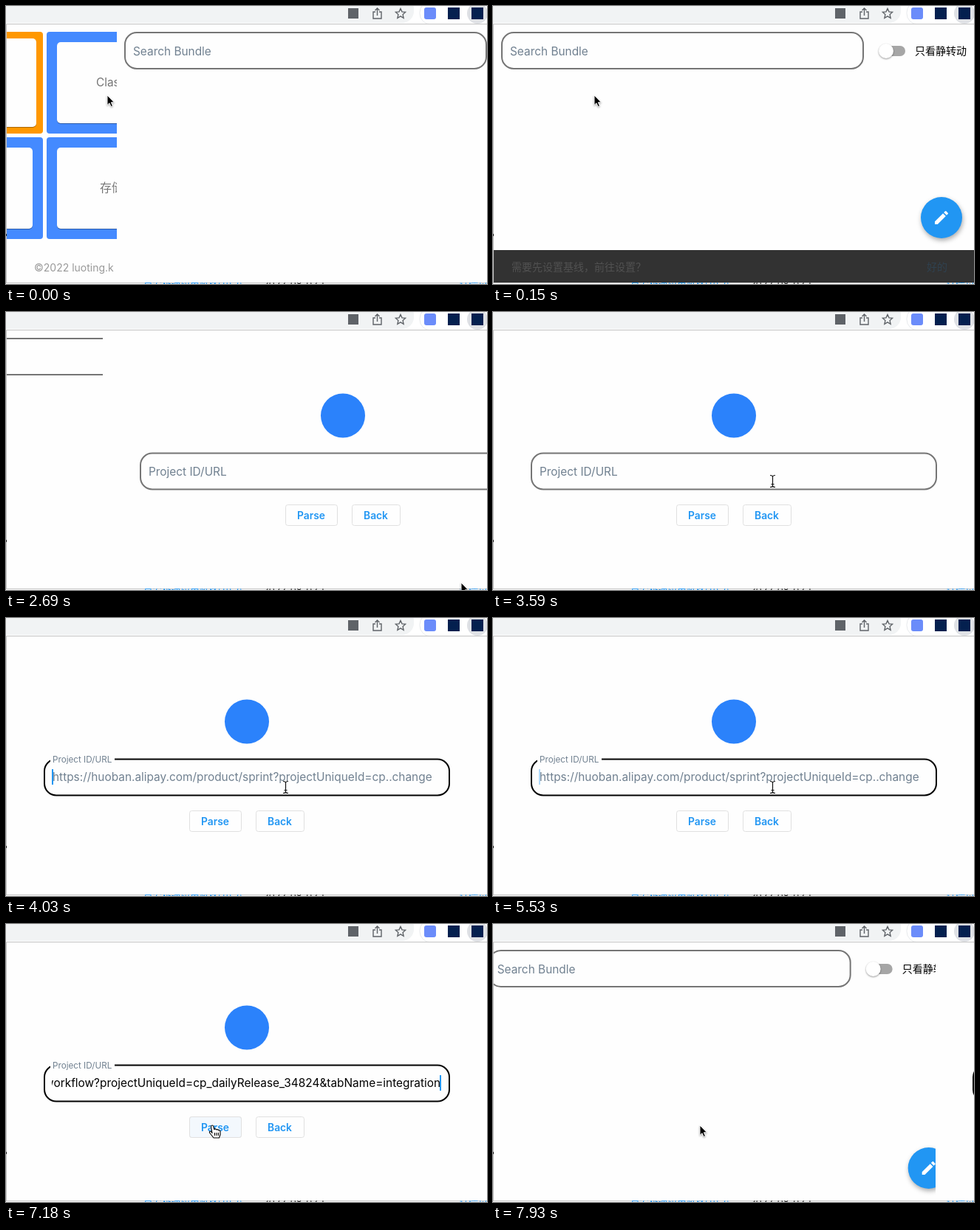
An HTML page that plays this animation: 651 by 377 pixels, repeating every 8 s.

```html
<!DOCTYPE html>
<html lang="en">
<head>
<meta charset="utf-8">
<title>Extension popup</title>
<style>
html, body { margin: 0; width: 100%; height: 100%; overflow: hidden; background: #fff; }
svg { display: block; width: 651px; height: 377px; }
text { font: 15.4px Inter, "Noto Sans CJK SC", "Noto Sans CJK", sans-serif; white-space: pre; }
.cjk { font: 14px "Noto Sans CJK SC", "Noto Sans CJK", sans-serif; }
.behind text { font-size: 12.6px; }
.hint { fill: #708090; }
.page { fill: #fefefe; }
.field { fill: none; stroke: #757575; stroke-width: 2; }
.button rect { fill: #fefefe; stroke: #e0e0e0; }
.button text { font-size: 13.8px; font-weight: 600; fill: #2196f3; text-anchor: middle; }
.home text { fill: #757575; }
.shadow { filter: drop-shadow(1px 3px 3px #0005); }
.pointer path { stroke-linejoin: round; }
</style>
</head>
<body>
<svg viewBox="0 0 651 377">
  <defs>
    <clipPath id="popup"><rect x="1" y="25" width="650" height="350"/></clipPath>
    <clipPath id="input"><rect x="62" y="200" width="527" height="32"/></clipPath>
    <clipPath id="parseArea"><rect x="249" y="262" width="69" height="27" rx="3"/></clipPath>
    <clipPath id="actionArea"><rect x="563" y="336" width="77" height="34" rx="3"/></clipPath>
  </defs>

  <!-- Browser toolbar -->
  <rect x="-30" y="-12" width="582" height="35" rx="16" fill="#f1f3f4"/>
  <rect x="560" y="-6" width="120" height="31" rx="15" fill="#fff" stroke="#e8eaed"/>
  <circle cx="638" cy="10" r="14" fill="#dfe1e5"/>
  <rect x="463" y="3" width="14" height="14" fill="#5f6368"/>
  <g fill="none" stroke="#5f6368" stroke-width="1.4">
    <path d="M500 8h-3v9h11v-9h-3M502.500 13V3.500M499.500 6l3-3 3 3"/>
    <path d="M534 3.500l2 4.400 4.600.5-3.500 3.200 1 4.700-4.100-2.400-4.100 2.400 1-4.700-3.500-3.200 4.600-.5z"/>
  </g>
  <rect x="566" y="2" width="16" height="16" rx="3" fill="#6b8cfa"/>
  <rect x="598" y="2" width="16" height="16" fill="#04204f"/>
  <rect x="630" y="2" width="16" height="16" fill="#04204f"/>

  <!-- Popup outline, and a sliver of the web page behind it -->
  <path d="M.5 376V24.500H651M0 375.500H651" fill="none" stroke="#c4c4c4"/>
  <g class="behind">
    <text class="cjk" x="186" y="381.500" fill="#2196f3">百安极速应用风格(10.2)</text>
    <text x="348" y="381.500" fill="#333">2022-08-02 1</text>
    <text class="cjk" x="614" y="381.500" fill="#2196f3">详情页</text>
    <rect y="309" width="1" height="3" fill="#222"/>
  </g>

  <g clip-path="url(#popup)">
    <rect class="page" x="1" y="25" width="650" height="350"/>
    <g id="home" class="home">
      <g id="cards"></g>
      <text x="289" y="109">Class Diff</text>
      <text x="294" y="252" class="cjk" style="font-size:16px">存储分析</text>
      <text x="205" y="360" style="font-size:14px;fill:#999">©2022 luoting.k All rights reserved</text>
    </g>

    <g id="search">
      <rect class="page" x="1" y="25" width="651" height="350"/>
      <rect class="field" x="12" y="36" width="489" height="49" rx="16"/>
      <text class="hint" x="23" y="67">Search Bundle</text>
      <rect x="524" y="54" width="34" height="14" rx="7" fill="#a6a6a6"/>
      <circle cx="532" cy="61" r="10" fill="#fff" style="filter:drop-shadow(0 1px 1px #0006)"/>
      <text class="cjk" x="571" y="66">只看静转动</text>
      <g id="fab">
        <circle class="shadow" r="28" fill="#2196f3"/>
        <path transform="translate(-12 -12)" fill="#fff" d="M3 17.250V21h3.750L17.810 9.940l-3.750-3.750zM20.710 7.040a1 1 0 0 0 0-1.410l-2.340-2.340a1 1 0 0 0-1.410 0l-1.830 1.830 3.750 3.750z"/>
      </g>
      <g id="snackbar">
        <rect x="1" y="330" width="650" height="50" fill="#323232"/>
        <rect id="actionHover" x="563" y="336" width="77" height="34" rx="3" fill="#2196f3"/>
        <circle id="actionRipple" cx="612" cy="360" clip-path="url(#actionArea)" fill="#2196f3" opacity=".18"/>
        <g id="snackText">
          <text class="cjk" x="25" y="358" fill="#fff">需要先设置基线，前往设置？</text>
          <text class="cjk" x="587" y="358" fill="#2196f3" style="font-weight:500">好的</text>
        </g>
      </g>
    </g>

    <g id="project">
      <rect class="page" x="1" y="25" width="651" height="350"/>
      <circle cx="326" cy="140.500" r="30" fill="#2b82fb"/>
      <rect id="border" class="field" x="52" y="191.500" width="548" height="49" rx="16"/>
      <rect id="notch" class="page" x="60" y="189" width="87" height="6"/>
      <text id="label" class="hint" x="63">Project ID/URL</text>
      <g clip-path="url(#input)">
        <text id="example" class="hint" x="63" y="221">https://huoban.alipay.com/product/sprint?projectUniqueId=cp..change</text>
        <text id="value" x="588" y="221" text-anchor="end">/workflow?projectUniqueId=cp_dailyRelease_34824&amp;tabName=integration</text>
      </g>
      <rect id="caret" y="205" width="2" height="21" fill="#2196f3"/>
      <g class="button">
        <rect x="248.500" y="261.500" width="70" height="28" rx="3"/>
        <rect id="parseHover" x="248.500" y="261.500" width="70" height="28" rx="3" style="fill:#f3f8fd"/>
        <circle id="parseRipple" cx="281" cy="276" clip-path="url(#parseArea)" fill="#2196f3" opacity=".12"/>
        <text x="283" y="280.500">Parse</text>
        <rect x="338.500" y="261.500" width="65" height="28" rx="3"/>
        <text x="370.500" y="280.500">Back</text>
      </g>
    </g>
  </g>

  <g class="pointer">
    <path id="arrow" fill="#000" stroke="#fff" d="M0 0V13.500L3 10.700L5.200 15.500L7.500 14.500L5.400 9.800H9.500Z" style="filter:drop-shadow(0 1px 1px #0005)"/>
    <path id="hand" fill="#fff" stroke="#000" stroke-width="1.100" d="M-4 2L-5.500-6.500Q-5.500-8.500-4-8.500T-2.200-7L-1.200-3Q.5-4.500 1.800-2.500Q3.500-3.600 4.500-1.800Q6.800-2.300 7 0V4L5.500 8.500H-2L-7.500 1.500Q-8-1-5.500 0ZM-.5 1.500V5.500M2 1.500V5.500M4.400 1.500V5.500"/>
    <path id="beam" fill="none" stroke="#111" stroke-width="1.200" d="M-3.500-8Q0-8 0-6Q0-8 3.500-8M0-6V6M-3.500 8Q0 8 0 6Q0 8 3.500 8M-2 4H2"/>
  </g>
</svg>

<script>
const LOOP = 8000, STEP = 150, WIDTH = 650;
const $ = id => document.getElementById(id);
const set = (id, attrs) => {
  for (const name in attrs) $(id).setAttribute(name, attrs[name]);
};
const show = (id, visible) => set(id, { visibility: visible ? "inherit" : "hidden" });

// The picture advances in steps, with two longer holds.
function steppedTime(t) {
  const [start, end] = t < 1640 ? [0, 1350] : t < 3880 ? [1640, 3590] : [3880, LOOP];
  return Math.min(end, start + Math.floor((t - start) / STEP) * STEP);
}

// Linear interpolation through [time, value] points.
function track(t, ...points) {
  const next = points.findIndex(p => p[0] > t);
  if (next < 0) return points[points.length - 1][1];
  if (next === 0) return points[0][1];
  const [t0, v0] = points[next - 1], [t1, v1] = points[next];
  return v0 + (v1 - v0) * (t - t0) / (t1 - t0);
}

const pointerPath = [
  [0, 137, 121], [450, 137, 121], [600, 160, 150], [750, 236, 250], [900, 277, 285],
  [1050, 277, 285], [1200, 420, 312], [1350, 539, 325], [1640, 580, 346], [1790, 608, 361],
  [1940, 616, 367], [2840, 616, 367], [3290, 400, 245], [3440, 378.5, 229.5],
  [6280, 378.5, 229.5], [6430, 366, 236], [6730, 310, 264], [7030, 283, 281.5],
  [7630, 283, 281.5], [7780, 280, 273]
];
const pointerKinds = [
  [0, "arrow"], [1790, "hand"], [2690, "arrow"], [3440, "beam"],
  [6580, "arrow"], [6880, "hand"], [7780, "arrow"]
];

function drawCards() {
  const card = (x, y, color, inset) => {
    const width = 211 - 2 * inset, height = 138 - 2 * inset;
    return `<rect x="${x}" y="${y}" width="211" height="138" rx="4" fill="${color}"/>
      <rect x="${x + inset}" y="${y + inset}" width="${width}" height="${height}" rx="5"
        fill="#fefefe" style="filter:drop-shadow(0 1px 0 #0005)"/>`;
  };
  let markup = "";
  for (const y of [35, 178])
    for (const x of [6, 222, 438])
      markup += x === 6 && y === 35 ? card(x, y, "#ff9800", 9) : card(x, y, "#448aff", 14);
  $("cards").innerHTML = markup;
}

function drawPages(t) {
  const projectX = track(t, [2390, WIDTH], [2540, 500], [2690, 130], [2840, 12], [2990, 0],
    [7630, 0], [7780, 250], [7930, 598]);
  const entering = track(t, [0, 149], [150, 0]);
  // A covered page moves a third as far as the one above it.
  const behind = x => (x - WIDTH) / 3;
  set("home", { transform: `translate(${behind(entering)})` });
  set("search", { transform: `translate(${entering + behind(projectX)})` });
  set("project", { transform: `translate(${projectX})` });
}

function drawSnackbar(t) {
  const drop = track(t, [2390, 0], [2540, 10], [2690, 45]);
  show("snackbar", t >= 150 && t < 2690);
  set("snackbar", { transform: `translate(0 ${t === 150 ? 1 : drop})` });
  set("snackText", { opacity: track(t, [150, .15], [300, 1]) });
  set("actionHover", { opacity: t >= 1790 ? .06 : 0 });
  set("actionRipple", { r: track(t, [1940, 0], [2090, 28], [2240, 60]) });
  show("actionRipple", t >= 2090 && t < 2240);
  const fabY = t < 150 ? 331 : t === 150 ? 287 : 286 + drop;
  set("fab", { transform: `translate(607 ${fabY})` });
}

function drawInput(t) {
  const focus = track(t, [3730, 0], [3880, .6], [4030, 1]);
  const shade = 117 * (1 - focus), pasted = t >= 5680;
  set("border", { style: `stroke:rgb(${shade},${shade},${shade})` });
  set("notch", { opacity: focus });
  set("label", { y: 222 - 26 * focus });
  $("label").style.fontSize = 15.4 - 3.7 * focus + "px";
  set("example", { opacity: track(t, [3880, .3], [4030, 1]) });
  show("example", t >= 3880 && !pasted);
  show("value", pasted);
  set("caret", {
    x: pasted ? 587 : 62,
    opacity: track(t, [3730, 0], [3880, 1], [4330, 1], [4480, .35], [4630, 0], [4780, 0],
      [4930, .3], [5080, .8], [5230, 1], [5380, 1], [5530, .35], [5680, .8], [5830, 1],
      [6280, 1], [6430, .6], [6580, 0], [6730, 0], [7030, 1], [7330, 1], [7480, .4], [7630, 0])
  });
}

function drawPointer(t) {
  const x = track(t, ...pointerPath.map(([time, x]) => [time, x]));
  const y = track(t, ...pointerPath.map(([time, , y]) => [time, y]));
  const kind = pointerKinds.filter(k => k[0] <= t).pop()[1];
  for (const id of ["arrow", "hand", "beam"]) show(id, id === kind);
  set(kind, { transform: `translate(${x} ${y})` });
}

function draw(t) {
  drawPages(t);
  drawSnackbar(t);
  drawInput(t);
  drawPointer(t);
  show("parseHover", t >= 6880 && t < 7780);
  show("parseRipple", t >= 7330 && t < 7780);
  set("parseRipple", { r: track(t, [7180, 0], [7330, 15], [7630, 50]) });
}

function frame() {
  draw(steppedTime(performance.now() % LOOP));
  requestAnimationFrame(frame);
}

drawCards();
frame();
</script>
</body>
</html>
```
